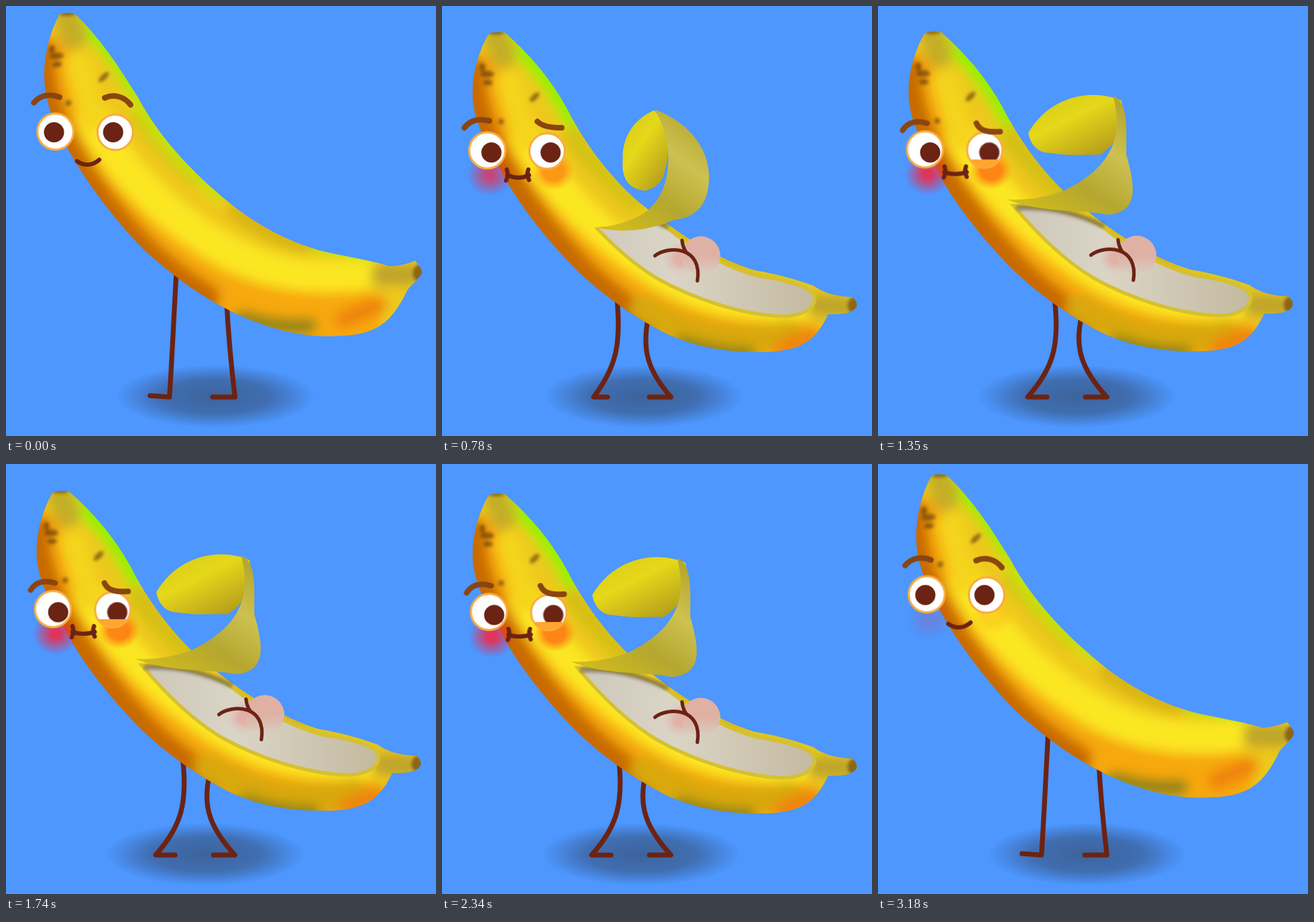
An HTML page without scripts that plays this animation: 618 by 618 pixels, repeating every 3210 ms.

```html
<!DOCTYPE html>
<html lang="en">
<head>
<meta charset="utf-8">
<title>Shy banana</title>
<style>
html, body { margin: 0; width: 100%; height: 100%; overflow: hidden; background: #4d97ff; }
svg { display: block; width: 100vw; height: 100vh; }
.line { fill: none; stroke: #6b2314; stroke-width: 7; stroke-linecap: round; stroke-linejoin: round; }
.brow { stroke: #8a4510; stroke-width: 8; }
.thin { stroke-width: 5; }
.lips { stroke-width: 6; }
.paint { fill: none; stroke-linecap: round; }
.eye { fill: #fff; stroke: #f9ab42; stroke-width: 3; }
.pupil { fill: #6b2314; }

#shadow, #legL, #legR, #body, #outline, #skin, #opening, #leaf, #ribbon, #flap,
#fresh, #lime, #aged, #face, #browL, #browR, #mouth, #ticks, #blush, #lid, .pupil {
  animation: 3210ms linear infinite;
}
#shadow { animation-name: shadow; }
#legL { animation-name: leg-l; }
#legR { animation-name: leg-r; }
#body { animation-name: body; }
#outline { animation-name: outline; }
#skin { animation-name: skin; }
#opening { animation-name: opening; }
#leaf { animation-name: leaf; }
#ribbon { animation-name: ribbon; }
#flap { animation-name: flap; }
#fresh { animation-name: fresh; }
#lime { animation-name: lime; }
#aged { animation-name: aged; }
#face { animation-name: face; }
#browL { animation-name: brow-l; }
#browR { animation-name: brow-r; }
#mouth { animation-name: mouth; }
#ticks { animation-name: ticks; }
#blush { animation-name: blush; }
#lid { animation-name: lid; }
.pupil { animation-name: look; }

@keyframes shadow {
  0%, 2.8%, 100% { transform: translateX(0); }
  24.3% { transform: translateX(-11px); }
  33%, 88% { transform: translateX(-15px); }
  99% { transform: translateX(-1px); }
}
@keyframes leg-l {
  0%, 2.8%, 99%, 100% { d: path("M245,380 C241,450 239,500 235,562 L207,560"); animation-timing-function: ease-in; }
  24.3% { d: path("M251,415 C258,485 251,518 218,562 L238,562"); animation-timing-function: ease-out; }
  33%, 82% { d: path("M253,415 C262,485 253,520 215,562 L243,562"); }
  87.85% { d: path("M250,418 C253,480 247,525 222,562 L232,562"); }
}
@keyframes leg-r {
  0%, 2.8%, 99%, 100% { d: path("M317,425 C320,480 324,520 329,562 L297,562"); animation-timing-function: ease-in; }
  24.3% { d: path("M297,445 C287,492 294,522 329,562 L298,562"); animation-timing-function: ease-out; }
  33%, 82% { d: path("M293,445 C281,492 294,524 329,562 L298,562"); }
  87.85% { d: path("M301,450 C296,496 306,530 329,562 L297,562"); }
}
@keyframes body {
  0%, 24.3%, 100% { transform: matrix(1,0,0,1,0,0); }
  33% { transform: matrix(1,0,0,1,0,-2); }
  42.06% { transform: matrix(1,0,0,1,0,-1); }
  54.2% { transform: matrix(1,0,0,1,0,1); }
  72.9%, 80% { transform: matrix(1,0,0,1,0,5); }
  87.85% { transform: matrix(.988,.014,0,1,3,-1); }
  99.07% { transform: matrix(1,0,0,1,0,5); }
}
@keyframes outline {
  0%, 2.8%, 98%, 100% {
    d: path("M77,12 C83,9 94,9 100,12 C135,46 162,86 190,132 C218,184 258,228 300,265 C345,306 396,336 450,351 C485,360 520,364 552,374 C566,374 578,370 588,366 C592,372 597,375 598,383 C595,391 584,399 577,408 C556,452 534,473 480,474 C424,478 374,462 330,442 C280,418 240,388 200,352 C160,312 125,265 100,225 C78,185 57,150 55,105 C54,70 64,35 77,12Z");
    animation-timing-function: ease-in;
  }
  24.3%, 82% {
    d: path("M67,40 C73,37 84,37 90,38 C125,68 156,104 180,148 C200,188 235,240 282,281 C338,326 390,362 450,380 C482,385 512,394 534,402 C550,414 572,418 590,418 C594,422 597,426 596,432 C590,443 572,443 555,443 C540,475 522,495 470,497 C420,499 372,493 327,473 C276,448 236,419 196,382 C156,342 116,293 92,250 C70,207 46,172 44,130 C43,96 54,62 67,40Z");
  }
  87.85% {
    d: path("M67,40 C73,37 84,37 90,38 C125,68 156,104 180,148 C200,188 235,237 282,270 C340,316 382,347 450,380 C482,385 512,394 534,402 C550,414 572,418 590,418 C594,422 597,426 596,432 C590,443 572,443 555,443 C540,475 522,495 470,497 C420,499 372,493 327,473 C276,448 236,419 196,382 C156,342 116,293 92,250 C70,207 46,172 44,130 C43,96 54,62 67,40Z");
  }
}
@keyframes skin {
  0%, 2.8%, 98%, 100% { transform: matrix(1.0214,-.0435,-.0515,1.0066,11.4,-23.9); animation-timing-function: ease-in; }
  24.3%, 87.85% { transform: matrix(1,0,0,1,0,0); }
}
@keyframes opening {
  0%, 11%, 94%, 100% { d: path("M540,425 C545,425 550,425 555,420 L560,410 L640,310 L640,520 L540,520Z"); }
  18.5%, 87.85% { d: path("M275,370 C300,378 335,374 355,360 L372,330 L640,310 L640,520 L275,520Z"); }
  24.3%, 85% { d: path("M220,318 C250,325 275,322 300,318 L345,305 L640,310 L640,520 L220,520Z"); }
  31%, 82% { d: path("M180,278 C215,292 265,285 305,298 L345,308 L640,310 L640,520 L180,520Z"); }
}
@keyframes leaf {
  0%, 11%, 94%, 100% { d: path("M548,398 C544,396 538,397 535,400 C535,404 536,408 538,410 C540,410 541,409 542,408 C544,406 547,403 548,401 C549,400 549,399 548,398Z"); }
  18.5%, 87.85% { d: path("M350,252 C325,249 295,262 282,271 C293,285 305,295 317,300 C320,290 325,285 330,279 C336,270 350,264 354,258 C354,256 352,254 350,252Z"); }
  24.3%, 85% { d: path("M305,150 C280,160 258,185 260,222 C258,248 268,263 292,266 C308,262 316,252 319,242 C324,228 326,206 323,190 C319,173 313,158 305,150Z"); }
  31%, 82% { d: path("M350,137 C310,120 250,127 216,183 C219,200 230,212 245,212 C275,217 300,214 318,215 C334,206 342,195 346,180 C351,165 352,150 350,137Z"); }
}
@keyframes ribbon {
  0%, 11%, 94%, 100% { d: path("M535,400 C540,396 548,396 550,402 C552,410 550,418 545,422 C540,426 535,426 530,424 C534,422 536,418 538,414 C540,408 540,404 535,400Z"); }
  18.5%, 87.85% { d: path("M318,257 C360,243 412,248 410,285 C408,310 400,335 372,358 C345,380 305,380 275,370 C310,374 345,366 357,345 C378,315 375,265 318,257Z"); }
  24.3%, 85% { d: path("M306,149 C350,165 383,200 384,245 C384,285 365,305 335,307 C300,322 260,328 220,318 C250,318 285,305 300,290 C335,255 330,190 306,149Z"); }
  31%, 82% { d: path("M338,130 C362,140 356,185 357,215 C368,255 378,298 330,301 C285,292 240,300 185,279 C215,281 245,275 270,265 C330,235 355,195 338,130Z"); }
}
@keyframes flap {
  0%, 11%, 94%, 100% { opacity: 0; }
  12.5%, 92% { opacity: 1; }
}
@keyframes fresh {
  0%, 11%, 94%, 100% { opacity: 1; }
  16%, 89% { opacity: 0; }
}
@keyframes lime {
  0%, 18.5%, 87.85%, 100% { opacity: 1; }
  25%, 83% { opacity: 0; }
}
@keyframes aged {
  0%, 11%, 94%, 100% { opacity: 0; }
  16%, 89% { opacity: 1; }
}
@keyframes face {
  0%, 2.8%, 100% { transform: translate(0, 0); animation-timing-function: ease-in; }
  24.3% { transform: translate(-6px, 27px); }
  42.06% { transform: translate(-3.5px, 25.5px); }
  54.2% { transform: translate(-3.5px, 28px); }
  72.9% { transform: translate(-3.5px, 32px); }
  87.85% { transform: translate(-3.5px, 32.5px); }
  99.07% { transform: translate(-1px, 7px); }
}
@keyframes brow-l {
  0%, 2.8%, 99%, 100% { d: path("M40,139 C50,127 65,126 77,131"); }
  24.3% { d: path("M38,148 C48,135 61,135 74,138"); }
  35%, 87.85% { d: path("M39,153 C47,140 61,139 74,143"); }
}
@keyframes brow-r {
  0%, 2.8%, 99%, 100% { d: path("M142,132 C155,126 170,130 179,142"); }
  24.3% { d: path("M143,139 C151,147 166,148 178,148"); }
  35%, 87.85% { d: path("M145,143 C150,155 164,156 179,155"); }
}
@keyframes mouth {
  0%, 2.8%, 99%, 100% { d: path("M102,223 C112,230 124,230 134,221"); }
  24.3% { d: path("M100,216 C111,221 121,221 131,216"); }
  35%, 87.85% { d: path("M99,213 C108,217 121,217 131,213"); }
}
@keyframes ticks {
  0%, 14%, 94%, 100% { opacity: 0; transform: translateY(5px); }
  20% { opacity: 1; }
  24.3% { opacity: 1; transform: translateY(3px); }
  35%, 88% { opacity: 1; transform: translateY(0); }
}
@keyframes blush {
  0%, 5%, 100% { opacity: 0; }
  24.3% { opacity: .8; }
  35%, 87.85% { opacity: 1; }
  99.07% { opacity: .2; }
}
@keyframes lid {
  0%, 25%, 96%, 100% { transform: translateY(14px); }
  36%, 87.85% { transform: translateY(0); }
}
@keyframes look {
  0%, 2.8%, 99%, 100% { transform: translate(0, 0); }
  24.3% { transform: translate(8px, 2px); }
  35%, 87.85% { transform: translate(9.5px, 3.5px); }
}
</style>
</head>
<body>
<svg viewBox="0 0 618 618">
  <defs>
    <radialGradient id="gShadow">
      <stop offset="0" stop-color="#2a2626" stop-opacity=".46"/>
      <stop offset=".55" stop-color="#2a2626" stop-opacity=".36"/>
      <stop offset="1" stop-color="#2a2626" stop-opacity="0"/>
    </radialGradient>
    <radialGradient id="gRed">
      <stop offset=".2" stop-color="#f82440" stop-opacity=".85"/>
      <stop offset="1" stop-color="#f82440" stop-opacity="0"/>
    </radialGradient>
    <radialGradient id="gOrange">
      <stop offset=".5" stop-color="#ff7c14" stop-opacity=".9"/>
      <stop offset="1" stop-color="#ff8a14" stop-opacity="0"/>
    </radialGradient>
    <radialGradient id="gPink">
      <stop offset=".3" stop-color="#e2b0a6"/>
      <stop offset="1" stop-color="#dcc6ba" stop-opacity="0"/>
    </radialGradient>
    <linearGradient id="gCheek" x2="0" y2="1">
      <stop offset=".5" stop-color="#dfb1a5"/>
      <stop offset="1" stop-color="#d8cfc0"/>
    </linearGradient>
    <linearGradient id="gFlesh">
      <stop offset="0" stop-color="#cdc7ba"/>
      <stop offset=".4" stop-color="#dbd5c7"/>
      <stop offset="1" stop-color="#c3baa0"/>
    </linearGradient>
    <linearGradient id="gLeaf" x2=".8" y2="1">
      <stop offset="0" stop-color="#d3c81c"/>
      <stop offset=".45" stop-color="#e6d81a"/>
      <stop offset="1" stop-color="#b49d1c"/>
    </linearGradient>
    <linearGradient id="gRibbon" x1=".2" y1="1" x2=".9" y2="0">
      <stop offset="0" stop-color="#d2bc1c"/>
      <stop offset=".35" stop-color="#b5a730"/>
      <stop offset=".65" stop-color="#cdc150"/>
      <stop offset="1" stop-color="#b3a32a"/>
    </linearGradient>
    <filter id="soft" filterUnits="userSpaceOnUse" x="-40" y="-40" width="720" height="700"><feGaussianBlur stdDeviation="8"/></filter>
    <filter id="fuzz" x="-60%" y="-60%" width="220%" height="220%"><feGaussianBlur stdDeviation="2.2"/></filter>
    <clipPath id="cOutline"><path id="outline"/></clipPath>
    <clipPath id="cOpening"><path id="opening"/></clipPath>
    <clipPath id="cEye"><circle cx="157" cy="181.500" r="25"/></clipPath>
  </defs>

  <rect width="618" height="618" fill="#4d97ff"/>
  <ellipse id="shadow" cx="301" cy="561" rx="142" ry="45" fill="url(#gShadow)"/>
  <path id="legL" class="line"/>
  <path id="legR" class="line"/>

  <g id="body">
    <g clip-path="url(#cOutline)">
      <g id="skin">
        <g class="paint" filter="url(#soft)">
          <rect x="-40" y="-40" width="720" height="700" fill="#eec81a"/>
          <path d="M45,110 C48,180 110,280 200,378 S400,500 500,490" stroke="#f7a80a" stroke-width="86"/>
          <path d="M40,95 C40,180 105,285 200,384 Q240,422 290,455" stroke="#c86a04" stroke-width="46"/>
          <path d="M120,190 C150,250 220,325 300,376 S440,432 510,430" stroke="#fbe622" stroke-width="46"/>
          <path d="M96,110 L120,190" stroke="#f4d41e" stroke-width="36"/>
          <path d="M105,50 C150,92 170,130 190,165" stroke="#c2dc10" stroke-width="34"/>
          <path d="M118,68 Q160,106 186,160" stroke="#8cf400" stroke-width="18"/>
          <path d="M190,190 Q225,235 275,280" stroke="#d6c016" stroke-width="30"/>
          <path id="lime" d="M190,165 C215,210 250,250 310,298" stroke="#c6e20e" stroke-width="34"/>
          <path d="M330,330 Q380,368 430,382" stroke="#d8b418" stroke-width="26"/>
          <path id="fresh" d="M450,382 L522,396" stroke="#b0e410" stroke-width="24"/>
          <g id="aged">
            <path d="M290,435 C350,475 430,490 500,470" stroke="#d8a810" stroke-width="40"/>
            <path d="M440,380 L530,400" stroke="#dcc424" stroke-width="24"/>
          </g>
          <path d="M345,484 Q390,500 440,500" stroke="#8f8414" stroke-width="22"/>
          <path d="M490,492 L535,474" stroke="#f08408" stroke-width="26"/>
          <path d="M76,40 L88,72" stroke="#c4ae28" stroke-width="36"/>
          <path d="M540,430 L580,432" stroke="#bfa52c" stroke-width="32"/>
        </g>
        <g filter="url(#fuzz)" fill="#5c3410" opacity=".6">
          <ellipse cx="65" cy="98" rx="10" ry="5"/>
          <ellipse cx="58" cy="88" rx="4" ry="6"/>
          <ellipse cx="66" cy="110" rx="7" ry="4"/>
          <ellipse cx="133" cy="131" rx="9" ry="4" transform="rotate(-45 133 131)"/>
          <circle cx="85" cy="166" r="4"/>
          <ellipse cx="78" cy="38" rx="12" ry="3"/>
          <ellipse cx="592" cy="430" rx="9" ry="12"/>
        </g>
      </g>
    </g>

    <g clip-path="url(#cOpening)">
      <path d="M195,288 C250,290 300,300 330,324 C350,340 400,374 455,388 C495,394 525,402 534,414 C541,432 520,446 490,446 C430,444 360,420 310,392 C270,368 230,330 195,288Z" fill="url(#gFlesh)" stroke="#d6c030" stroke-width="5"/>
      <path d="M202,291 Q262,288 322,316" class="paint" stroke="#686150" stroke-width="8" opacity=".6" filter="url(#fuzz)"/>
      <ellipse cx="343" cy="363" rx="28" ry="25" fill="url(#gPink)"/>
      <circle cx="372" cy="359" r="28" fill="url(#gCheek)"/>
      <path class="line thin" d="M306,359 C325,344 375,345 367,395 M345,337 Q346,347 351,354"/>
    </g>

    <g id="flap">
      <path id="leaf" fill="url(#gLeaf)"/>
      <path id="ribbon" fill="url(#gRibbon)"/>
    </g>
  </g>

  <g id="face">
    <g id="blush">
      <ellipse cx="75" cy="216" rx="33" ry="30" fill="url(#gRed)"/>
      <ellipse cx="166" cy="211" rx="30" ry="27" fill="url(#gOrange)"/>
    </g>
    <circle class="eye" cx="71" cy="180.500" r="26"/>
    <circle class="eye" cx="157" cy="181.500" r="25.500"/>
    <circle class="pupil" cx="69" cy="181.500" r="14.500"/>
    <g clip-path="url(#cEye)">
      <circle class="pupil" cx="154" cy="181.500" r="14.500"/>
      <rect id="lid" x="130" y="195" width="54" height="16" fill="#ffa530"/>
    </g>
    <path id="browL" class="line brow"/>
    <path id="browR" class="line brow"/>
    <path id="mouth" class="line lips"/>
    <path id="ticks" class="line lips" d="M99,205 Q102,213 98,221 M130,205 Q127,213 131,220"/>
  </g>
</svg>
</body>
</html>
```
